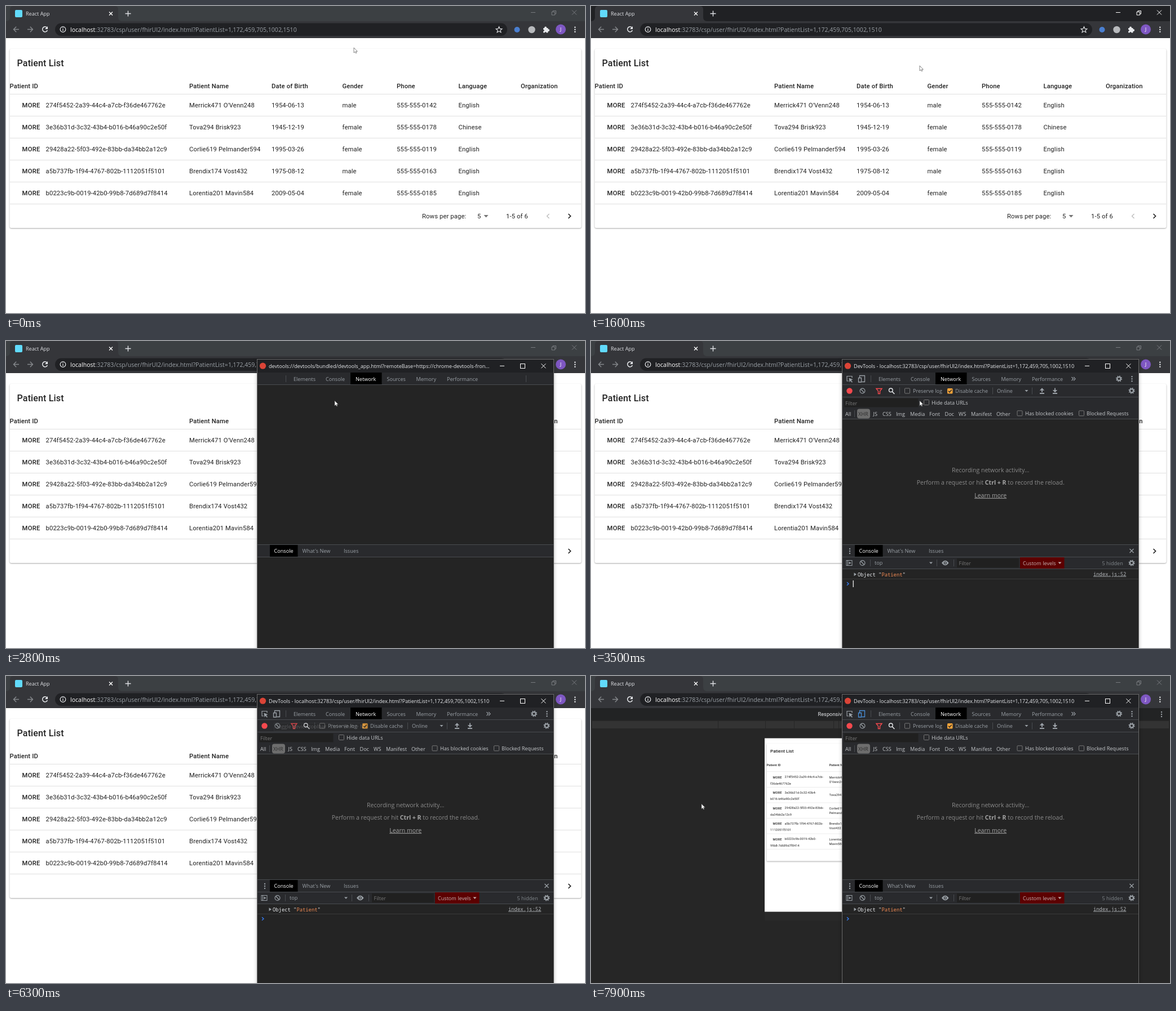
An HTML page that plays this animation: 1027 px wide and 545 px high, repeating every 8 s.

```html
<!DOCTYPE html>
<html lang="en">
<head>
<meta charset="utf-8">
<title>Patient List</title>
<style>
html, body { margin: 0; height: 100%; overflow: hidden; background: #fff; }
svg { display: block; width: 100vw; height: 100vh; font-family: "Open Sans", "Noto Sans", sans-serif; white-space: pre; }
.page text { font-family: Roboto, sans-serif; letter-spacing: .0107em; }
.page .title { letter-spacing: .0075em; }
.page .button { letter-spacing: .0286em; }
.mono { font-family: "Noto Sans Mono", "DejaVu Sans Mono", monospace; }
.card { filter: drop-shadow(0 1px 1px rgba(0,0,0,.35)); }
.sheet { filter: drop-shadow(0 2px 4px rgba(0,0,0,.5)); }
.win { filter: drop-shadow(0 1px 3px rgba(0,0,0,.25)); }
</style>
</head>
<body>
<svg id="stage" viewBox="0 0 1027 545"></svg>
<script>
const GREY = '#9aa0a6', LIGHT = '#e8eaed', PANEL = '#242424', BAR = '#292a2d', LINE = '#494c50';

// Drawing helpers; text is placed by the middle of its capitals
const text = (x, y, s, fill = LIGHT, size = 9.1, more = '') =>
  `<text x="${x}" y="${y + size * .357}" fill="${fill}" font-size="${size}" ${more}>${s}</text>`;
const rect = (x, y, w, h, fill, more = '') =>
  `<rect x="${x}" y="${y}" width="${w}" height="${h}" fill="${fill}" ${more}/>`;
const disc = (x, y, r, fill) => `<circle cx="${x}" cy="${y}" r="${r}" fill="${fill}"/>`;
const ring = (x, y, r, c, w = 1.2, more = '') =>
  `<circle cx="${x}" cy="${y}" r="${r}" fill="none" stroke="${c}" stroke-width="${w}" ${more}/>`;
const line = (d, c, w = 1) => `<path d="${d}" fill="none" stroke="${c}" stroke-width="${w}"/>`;
const shape = (d, fill, more = '') => `<path d="${d}" fill="${fill}" ${more}/>`;
const group = (id, body, more = '') => `<g id="${id}" ${more}>${body}</g>`;
const cross = (x, y, r, c, w = 1) => line(`M${x - r} ${y - r}l${2 * r} ${2 * r}m0 ${-2 * r}l${-2 * r} ${2 * r}`, c, w);
const dots = (x, y, c) => [-4, 0, 4].map(d => disc(x, y + d, 1.2, c)).join('');
const sep = (x, y) => rect(x, y - 6, 1, 12, LINE);
const caretDown = (x, y, c, r = 3) => shape(`M${x - r} ${y - r * .5}h${2 * r}l${-r} ${r * 1.1}z`, c);
const gear = (x, y) => ring(x, y, 3.1, GREY, 2) + ring(x, y, 4.7, GREY, 1.7, 'stroke-dasharray="1.9 1.79"');
const box = (x, y) => rect(x - 4.5, y - 4.5, 9, 9, 'none', 'stroke="#777" rx="1"');
const clear = (x, y) => ring(x, y, 4.4, GREY) + line(`M${x - 3} ${y - 3}l6 6`, GREY, 1.2);
const windowButtons = (x, y, gap, c) => line(`M${x - 4} ${y}h8`, c) + cross(x + 2 * gap, y, 4, c);

const patients = [
  ['274f5452-2a39-44c4-a7cb-', 'f36de467762e', 'Merrick471', "O'Venn248", '1954-06-13', 'male', '555-555-0142', 'English'],
  ['3e36b31d-3c32-43b4-', 'b016-b46a90c2e50f', 'Tova294', 'Brisk923', '1945-12-19', 'female', '555-555-0178', 'Chinese'],
  ['29428a22-5f03-492e-83bb-', 'da34bb2a12c9', 'Corlie619', 'Pelmander594', '1995-03-26', 'female', '555-555-0119', 'English'],
  ['a5b737fb-1f94-4767-802b-', '1112051f5101', 'Brendix174', 'Vost432', '1975-08-12', 'male', '555-555-0163', 'English'],
  ['b0223c9b-0019-42b0-', '99b8-7d689d7f8414', 'Lorentia201', 'Mavin584', '2009-05-04', 'female', '555-555-0185', 'English']
];
const INK = '#222', MEDIUM = 'font-weight="500"';
const TITLE = MEDIUM + ' class="title"', BUTTON = MEDIUM + ' class="button"';

function browser() {
  const frame = (id, strip, c) => group(id,
    rect(0, 0, 1027, 28, strip) +
    shape('M0 27Q7 27 7 20V6Q7 0 13 0H193Q199 0 199 6V20Q199 27 206 27Z', '#35363a') +
    windowButtons(935, 11.5, 36.5, c) +
    line('M968 10.5h5.5v5.5h-5.5zM970 10.5v-2h5.5v5.5h-2', c));
  return frame('idle', '#3c4043', '#777a7e') + frame('active', '#202124', '#fff') +
    rect(0, 27, 1027, 30, '#35363a') +
    rect(16, 7, 13, 13, '#61dafb', 'rx="2"') + text(35, 13.5, 'React App', '#dfe1e5') +
    cross(186, 13.5, 3, '#fff', 1.3) + line('M211.5 13.5h10m-5-5v10', '#dfe1e5', 1.4) +
    line('M23 41.5h-9.5m4.7-4.7l-4.7 4.7l4.7 4.7', '#85888c', 1.4) +
    line('M38 41.5h9.5m-4.7-4.7l4.7 4.7l-4.7 4.7', '#85888c', 1.4) +
    line('M72.5 38.3A4.5 4.5 0 1 0 73.4 43', LIGHT, 1.5) + shape('M74 36v5h-5z', LIGHT) +
    rect(87, 30.5, 802, 22.5, '#202124', 'rx="11.2"') +
    ring(101, 41.5, 4.8, LIGHT) + line('M101 40.8v3.4m0-6v1.3', LIGHT, 1.3) +
    text(114, 42, 'localhost<tspan fill="#9aa0a6">:32783/csp/user/fhirUI2/index.html?PatientList=1,172,459,705,1002,1510</tspan>', '#fff', 10.58) +
    line('M874.5 36.7l1.5 3.6l3.9.3l-3 2.5l1 3.8l-3.4-2.1l-3.4 2.1l1-3.8l-3-2.5l3.9-.3z', LIGHT, 1.1) +
    disc(906.5, 42, 5, '#4a7fd0') + disc(932.5, 42, 6.2, '#b8babd') +
    rect(953, 39, 8.5, 8.5, LIGHT, 'rx="1"') + disc(957, 38.6, 2, LIGHT) + disc(962, 43, 2, LIGHT) +
    disc(953, 43.3, 1.5, '#35363a') + disc(957, 47.5, 1.5, '#35363a') +
    disc(984, 41.5, 9, '#7e57c2') + text(984, 41.5, 'J', '#fff', 9.5, 'text-anchor="middle"') +
    dots(1009.3, 41.7, LIGHT);
}

function fullPage() {
  const cols = [325, 471, 596.5, 693, 802.5, 913];
  const cell = (x, y, s, more) => text(x, y, s, INK, 11.25, more);
  const heads = ['Patient Name', 'Date of Birth', 'Gender', 'Phone', 'Language', 'Organization'];
  return rect(0, 57, 1027, 488, '#fff') +
    rect(6.5, 76, 1014, 318, '#fff', 'rx="3" class="card"') +
    text(19.5, 101.5, 'Patient List', INK, 16.07, TITLE) +
    cell(6.5, 142, 'Patient ID', MEDIUM) +
    heads.map((h, i) => cell(cols[i], 142, h, MEDIUM)).join('') +
    rect(7, 156, 1013, 1, '#e0e0e0') +
    patients.map(([id, rest, first, last, ...more], i) => {
      const y = 176 + 39 * i;
      return cell(28.5, y, 'MORE', BUTTON) + cell(70.5, y - .4, id + rest) +
        [first + ' ' + last, ...more].map((s, k) => cell(cols[k], y, s)).join('') +
        rect(7, y + 19, 1013, 1, '#e0e0e0');
    }).join('') +
    cell(738, 373, 'Rows per page:') + cell(836, 373, '5') + cell(887, 373, '1-5 of 6') +
    caretDown(851.5, 373, '#757575', 4) +
    line('M963.5 369l-4 4l4 4', '#bdbdbd', 1.4) + line('M997.5 369l4 4l-4 4', INK, 1.7);
}

function phonePage() {
  const cell = (x, y, s, more) => text(x, y, s, INK, 5.6, more);
  const marks = [2, 226, 310, 361, 431, 440, 1026];
  return rect(0, 57, 1027, 488, '#262626') + rect(0, 57, 1027, 21, '#222324') +
    text(402.5, 68, 'Responsive') + dots(1012, 68, GREY) +
    marks.slice(1).map((x, i) => rect(marks[i], 80, x - marks[i] - 1, 13, '#333')).join('') +
    rect(308, 418, 300, 16, '#2a2a2a') + rect(308, 110.5, 300, 308, '#fff') +
    rect(311.5, 120, 290, 208.5, '#fff', 'rx="1.5" class="card"') +
    text(318, 133, 'Patient List', INK, 8, TITLE) +
    cell(311.5, 158, 'Patient ID', MEDIUM) + cell(422.5, 158, 'Patient Name', MEDIUM) +
    rect(312, 169.5, 280, .6, '#e0e0e0') +
    patients.map(([id, rest, first, last], i) => {
      const y = 179.6 + 27.5 * i;
      const name = i == 1 ? cell(422.5, y + 4, first + ' ' + last)
        : cell(422.5, y, first) + cell(422.5, y + 8.2, last);
      return cell(322.5, y, 'MORE', BUTTON) + cell(343.5, y - .3, id) +
        cell(318, y + 11, rest) + name + rect(312, y + 17.6, 280, .6, '#e0e0e0');
    }).join('');
}

function devtools() {
  const tabs = [[510, 'Elements'], [567, 'Console'], [620, 'Network'], [675.5, 'Sources'], [727.5, 'Memory'], [782, 'Performance']];
  const types = [[451, 'All'], [500.5, 'JS'], [517, 'CSS'], [541, 'Img'], [566, 'Media'], [600, 'Font'], [627.5, 'Doc'], [652, 'WS'], [674, 'Manifest'], [719, 'Other']];
  const labels = (list, y, c) => list.map(([x, s]) => text(x, y, s, s == 'Network' ? '#fff' : c)).join('');
  const hr = y => rect(446, y, 525, 1, LINE);
  const mid = (y, s, c, more = '') => text(708.7, y, s, c, 10.54, 'text-anchor="middle" ' + more);

  const shell = rect(445, 32, 527, 520, '#6a6a6a', 'class="win"') + rect(446, 33, 525, 512, PANEL) +
    rect(446, 33, 525, 23, '#202124') + disc(455.5, 44.2, 5.6, '#db4437') +
    windowButtons(880, 44.3, 36.7, '#fff') + rect(912.5, 40.5, 8, 8, 'none', 'stroke="#fff"') +
    rect(446, 56, 525, 21, BAR) + rect(611, 56, 55.5, 21, '#000') + hr(77) +
    sep(496, 67) + labels(tabs, 67.5, GREY) +
    hr(361) + rect(446, 362, 525, 21, BAR) + rect(468, 362, 49.5, 21, '#000') + hr(383) +
    text(475.5, 373, 'Console', '#fff') + text(525.5, 373, "What's New", GREY) + text(599, 373, 'Issues', GREY);

  const network =
    line('M457 71h-3v-8.5h9v3', GREY, 1.2) + shape('M457.5 65.5l7 3l-3 1.2l2.5 3l-1.2 1l-2.6-3l-1.7 2.5z', GREY) +
    group('device', line('M476.5 65V61.5h9V72.5h-5M474.5 65.5h5v7.5h-5z', 'currentColor', 1.3)) +
    line('M852.5 64l3 3.2l-3 3.2m3.5-6.4l3 3.2l-3 3.2', GREY, 1.2) + gear(936.5, 67) + dots(959.5, 67.3, GREY) +
    rect(446, 78, 525, 60, BAR) + hr(99) + hr(138) +
    disc(458.5, 88.5, 5.2, '#f4494e') + clear(481.5, 88.5) +
    line('M506 84.5h10l-3.5 4.5v4.5h-3v-4.5z', '#f4494e', 1.4) +
    ring(531.8, 87.3, 3.3, LIGHT, 1.4) + line('M534.3 90l4 4', LIGHT, 1.6) + sep(547, 88.5) +
    box(561, 88.5) + group('preserve', text(571, 88.7, 'Preserve log', 'currentColor')) +
    rect(632, 84, 9.5, 9.5, '#f2a33a', 'rx="1.5"') + line('M634 88.7l2 2.2l3.7-4.3', PANEL, 1.4) +
    text(646, 88.7, 'Disable cache', GREY) + sep(712, 88.5) + text(720, 88.7, 'Online', GREY) +
    caretDown(772.5, 88.5, GREY) + sep(782, 88.5) +
    line('M800 91v-4M823 83.5v4M796 93h8m15 0h8', GREY, 1.8) +
    shape('M795.8 87.8l4.2-4.5l4.2 4.5zM818.8 87l4.2 4.5l4.2-4.5z', GREY) + gear(959, 88.3) +
    rect(449, 102, 131.5, 15.5, '#202020') + text(451, 110.5, 'Filter', '#777') +
    box(595, 109) + text(604, 109.5, 'Hide data URLs', '#c5c8cb') +
    labels(types, 129.3, '#c5c8cb') + sep(467, 129) +
    rect(472, 120.5, 23, 17, '#6e6e6e', 'rx="4"') + text(474, 129.3, 'XHR', '#2c2c2c') +
    box(760.5, 128.3) + text(770, 128.5, 'Has blocked cookies', '#c5c8cb') +
    box(870, 128.3) + text(879, 128.5, 'Blocked Requests', '#c5c8cb') +
    mid(229, 'Recording network activity...', '#8a8a8a') +
    mid(251, 'Perform a request or hit <tspan font-weight="700" fill="#a5a5a5">Ctrl + R</tspan> to record the reload.', '#8a8a8a') +
    mid(274, 'Learn more', '#a5a5a5', 'text-decoration="underline"');

  const log = dots(459, 373, GREY) + cross(959, 372.5, 3.5, GREY, 1.3) +
    rect(446, 384, 525, 20, BAR) + hr(404) +
    rect(453, 389.5, 10, 9, 'none', `stroke="${GREY}"`) + line('M455.5 389.5v9', GREY) + shape('M457.5 391.5l4 2.5l-4 2.5z', GREY) +
    clear(481.5, 394) + sep(495, 394) + text(503, 394, 'top', GREY) + caretDown(603, 394, GREY) +
    sep(613, 394) + shape('M622 394q6.3-8.5 12.6 0q-6.3 8.5-12.6 0z', GREY) + disc(628.3, 394, 2.5, BAR) + disc(628.3, 394, 1.4, GREY) +
    sep(643, 394) + rect(649, 386, 110, 16, '#202020') + text(652.5, 394.3, 'Filter', '#777') +
    rect(761, 384, 78.5, 20, '#5c0000') + text(766, 394.3, 'Custom levels', '#c5b4b4') + caretDown(831.5, 394, '#c5b4b4') +
    text(906.5, 394.3, '5 hidden', '#80868b') + gear(959, 394) +
    shape('M466.5 411.3l4.5 3l-4.5 3z', GREY) +
    text(473, 414.5, 'Object "<tspan fill="#f28b54">Patient</tspan>"', LIGHT, 8.83, 'class="mono"') +
    text(891, 413.5, 'index.js:52', '#b0b3b7', 8.83, 'class="mono" text-decoration="underline"') +
    rect(446, 422, 525, 1, '#3a3a3a') + line('M454 428.3l3 2.7l-3 2.7', '#367cf1', 1.4) +
    group('caret', rect(464.6, 425, 1.2, 12, '#fff'));

  const tip = rect(475.5, 83.5, 166, 14, '#2b2b2b', 'stroke="#555"') +
    text(478.5, 89.8, 'Toggle device toolbar', '#fff') + text(574, 89.8, 'Ctrl + Shift + M', '#fff');

  return shell +
    group('loading', sep(922, 67) + text(466, 44.5, 'devtools://devtools/bundled/devtools_app.html?remoteBase=https://chrome-devtools-fron...')) +
    group('titled', text(466, 44.5, 'DevTools - localhost:32783/csp/user/fhirUI2/index.html?PatientList=1,172,459,705,1002,1510')) +
    group('content', network + log) + group('tip', tip);
}

stage.innerHTML = browser() +
  group('full', fullPage(), 'class="page"') + group('phone', phonePage(), 'class="page"') +
  group('fade', rect(447, 34, 523, 520, '#fff', 'class="sheet"')) +
  group('tools', devtools()) +
  group('arrow', shape('M0 0V9L2.1 7.2L3.5 9.9L4.9 9.2L3.6 6.6H6.3Z', '#fff', 'stroke="#555" stroke-width=".7"')) +
  group('hand', shape('M-1.2 .8Q0-.7 1.2 .8V4.3L5 5.2Q6.4 5.6 6.1 7.2L5 12.3H-.6L-3.4 8.2Q-3.4 6.6-2.2 7L-1.2 8Z', '#fff', 'stroke="#222" stroke-width=".8"'));

const el = id => document.getElementById(id);
const show = (id, v) => el(id).setAttribute('opacity', +v);
const within = (t, a, b) => t >= a && t < b;

// Pointer stops: time, x, y
const stops = [[0, 617, 74], [300, 601, 104], [400, 601, 104], [700, 583, 106], [4000, 583, 106], [4300, 560, 89],
  [4600, 500, 81.5], [4900, 480, 72], [5000, 480, 70], [6800, 480, 70], [7700, 222, 212], [7900, 196, 227]];

function pointer(t) {
  const i = stops.findIndex(s => s[0] > t);
  if (i < 0) return stops.at(-1).slice(1);
  const [a, b] = [stops[i - 1], stops[i]], k = (t - a[0]) / (b[0] - a[0]);
  return [1, 2].map(n => a[n] + (b[n] - a[n]) * k);
}

function draw(now) {
  const t = Math.floor(now % 8000 / 100) * 100;
  show('active', within(t, 1600, 2800));
  show('full', t < 6400);
  show('phone', t >= 6400);
  show('fade', t == 2600 ? .35 : t == 2700 ? .87 : 0);
  show('tools', t >= 2800);
  show('loading', t < 3000);
  show('titled', t >= 3000);
  show('content', t >= 3400);
  show('caret', within(t, 3400, 3900) || within(t, 4400, 5000) || within(t, 5500, 6000));
  show('tip', t == 5500 ? .5 : within(t, 5600, 6200) ? 1 : t == 6200 ? .6 : t == 6300 ? .2 : 0);
  el('device').style.color = t >= 6400 ? '#4a90d9' : within(t, 4900, 6200) ? '#fff' : GREY;
  el('preserve').style.color = within(t, 4200, 4400) ? '#fff' : GREY;

  const hand = within(t, 4400, 6900), place = `translate(${pointer(t)})`;
  show('hand', hand && t != 6300);
  show('arrow', !hand);
  el('hand').setAttribute('transform', place);
  el('arrow').setAttribute('transform', place);
}

const start = performance.now();
(function loop() {
  draw(performance.now() - start);
  requestAnimationFrame(loop);
})();
</script>
</body>
</html>
```
